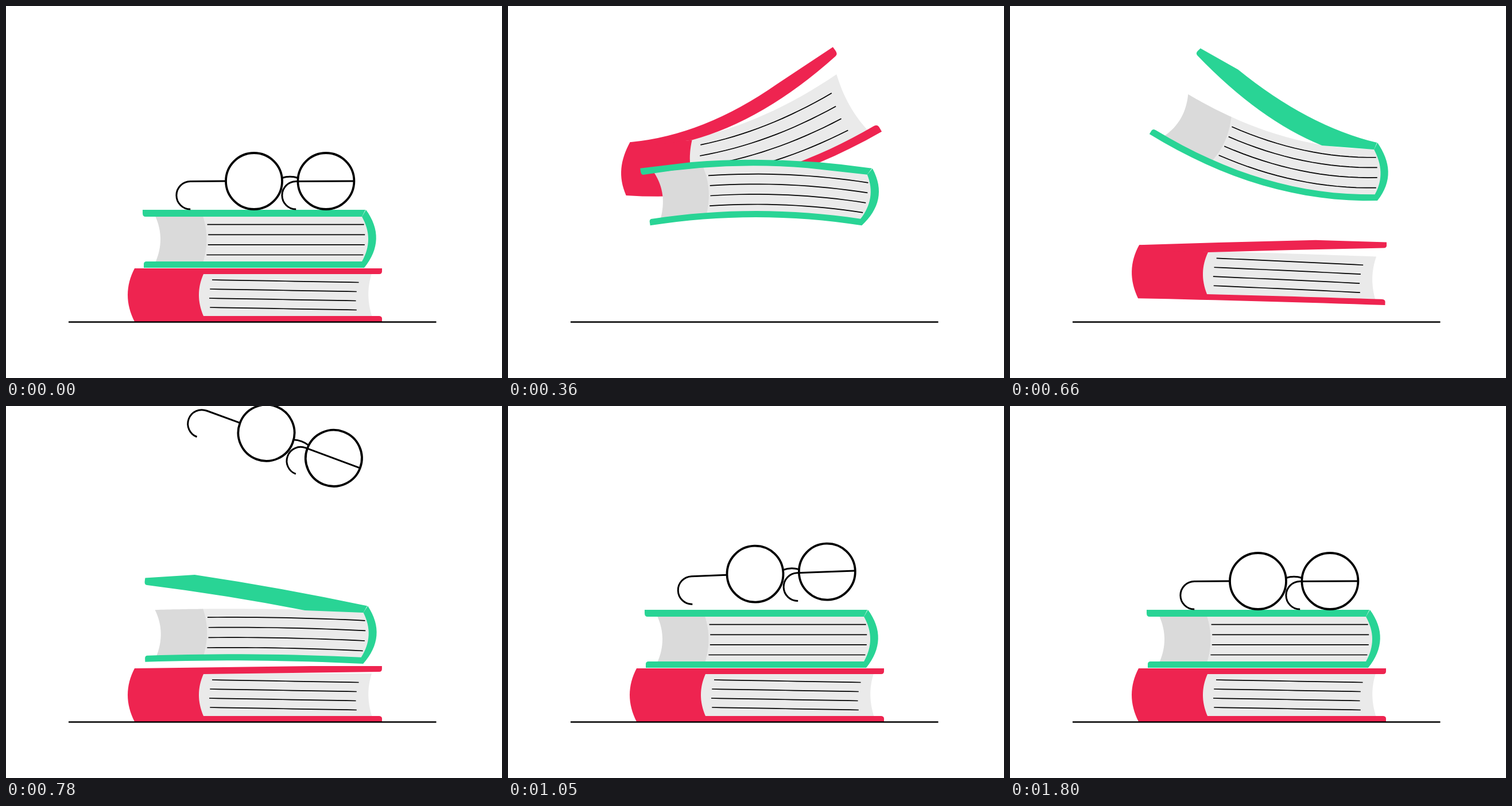
These frames come from a looping animation (864 by 648 pixels, 2460 ms). An HTML page with a canvas:

```html
<!DOCTYPE html>
<html lang="en">
<head>
<meta charset="utf-8">
<title>Books and glasses</title>
<style>
  html, body { margin: 0; width: 100%; height: 100%; overflow: hidden; background: #fff; }
  canvas { display: block; width: 864px; height: 648px; }
</style>
</head>
<body>
<canvas id="stage" width="864" height="648"></canvas>
<script>
const ctx = document.getElementById('stage').getContext('2d');
const LOOP = 2460, STEP = 30, GROUND = 550.5;
const PAPER = '#eaeaea', SHADE = '#dadada';
const LAUNCH = 87, LANDING = 477, SETTLED = 775;

const red = {
  delay: 0, color: '#ee2450', spine: 224, end: 655, top: 457, height: 93,
  slab: 10, hinge: 344, joint: 234, fold: 531, crest: 210, fan: .55,
  lines: { x: 354, y: 477, width: 255.5, gap: 16, drop: 4.5, curve: 1.25, middle: 2 },
  body(fill) {
    fill(PAPER, [344, 465], [328, 503, 344, 542], [638, 542], [625, 503, 637, 466]);
    fill(this.color, [224, 550], [200, 503, 224, 457], [344, 467], [328, 503, 344, 540],
      [649, 540], [655, 540, 655, 545], [655, 550]);
  }
};

const green = {
  delay: 240, color: '#29d495', spine: 626, end: 238, top: 355, height: 101,
  slab: 12, hinge: 519, joint: 620, fold: 324, crest: 300, fan: .05,
  lines: { x: 352.3, y: 380.7, width: 273, gap: 17.6, drop: 0, curve: -1, middle: 1.3 },
  body(fill) {
    fill(PAPER, [341, 366], [356, 406, 341, 447], [622, 447], [642, 406, 622, 366]);
    fill(SHADE, [260, 366], [278, 406, 260, 447], [343, 447], [356, 406, 343, 366]);
    fill(this.color, [627, 355], [664, 406, 624, 456], [240, 456], [240, 450],
      [240, 445, 245, 445], [620, 445], [642, 406, 620, 367]);
  }
};

const mix = (a, b, s) => a + (b - a) * s;
const clamp = s => Math.min(1, Math.max(0, s));
const progress = (t, from, to) => (t - from) / (to - from);
const arch = s => 4 * s * (1 - s);
const bump = (t, from, to) => arch(clamp(progress(t, from, to)));

// Height of a thrown object: one big leap from below, then a small rebound.
const rise = (t, rebound) => t < LANDING
  ? 284 * arch(progress(t, LAUNCH, LANDING))
  : rebound * bump(t, 515, SETTLED);

// The open end lags behind the spine, the pages flex and the cover flaps.
function motion(book, t) {
  const swing = Math.sin(Math.PI * (t - book.crest) / (510 - book.crest));
  const sweep = clamp(progress(t, 150, 545)) ** 1.5;
  return {
    lift: rise(t, 36),
    tilt: 112 * Math.sin(Math.PI * sweep) - 12 * bump(t, 520, 780),
    bow: t < 900 ? 35 * swing / (1 + Math.exp((t - 500) / 40)) : 0,
    open: .3 * Math.exp(-(((t - 460) / 95) ** 2)) + .05 * bump(t, 520, 800)
  };
}

function drawBook(book, time) {
  const t = time - book.delay;
  if (t < STEP) return;
  const { lift, tilt, bow, open } = motion(book, t);
  const { spine, end, top, height, slab } = book;
  const length = end - spine, side = Math.sign(length);
  const span = length * Math.cos(Math.atan(tilt / length));
  const midX = (spine + end) / 2 - side * .2 * Math.max(0, tilt);
  const midY = top + height / 2 - lift;

  // Bends a point of the resting book around its curved centre line.
  const bend = (x, y) => {
    const u = (x - spine) / length, v = (top + height - y) / height;
    const angle = Math.atan((bow * 4 * (1 - 2 * u) - tilt) / span);
    const reach = height * (v - .5 + book.fan * u * v * Math.max(0, tilt) / 112);
    return [midX + span * (u - .5) + reach * Math.sin(angle),
      midY - tilt * (u - .5) + bow * (arch(u) - 1) - reach * Math.cos(angle)];
  };
  const trace = points => {
    let [x, y] = points[0];
    ctx.beginPath();
    ctx.moveTo(...bend(x, y));
    for (const p of points.slice(1)) {
      const [qx, qy] = p.slice(-2);
      const [mx, my] = p.length > 2 ? p : [(x + qx) / 2, (y + qy) / 2];
      for (let i = 1; i <= 16; i++) {
        const s = i / 16;
        ctx.lineTo(...bend(mix(mix(x, mx, s), mix(mx, qx, s), s), mix(mix(y, my, s), mix(my, qy, s), s)));
      }
      [x, y] = [qx, qy];
    }
  };
  book.body((color, ...points) => {
    ctx.fillStyle = color;
    trace([...points, points[0]]);
    ctx.fill();
  });

  const { lines } = book;
  ctx.lineWidth = 1.7;
  for (let i = 0; i < 4; i++) {
    const x = lines.x + lines.curve * (i - lines.middle) ** 2, y = lines.y + lines.gap * i;
    trace([[x, y], [x + lines.width, y + lines.drop]]);
    ctx.stroke();
  }

  // Both long edges of the cover swing up from the spine.
  const swingUp = ([px, py], [x, y]) => {
    const c = Math.cos(open), s = -side * Math.sin(open);
    return [px + (x - px) * c - (y - py) * s, py + (x - px) * s + (y - py) * c];
  };
  const back = bend(spine, top), hinge = bend(book.hinge, top + slab);
  const fold = swingUp(back, bend(book.fold, top));
  const corner = swingUp(hinge, bend(end, top));
  const inner = swingUp(hinge, bend(end, top + slab));
  const rounded = swingUp(hinge, bend(end - side * 5, top + slab));
  const curveTo = ([x1, y1], [x2, y2]) =>
    ctx.quadraticCurveTo((x1 + x2) / 2, (y1 + y2) / 2 + 1.15 * bow, x2, y2);
  ctx.fillStyle = book.color;
  ctx.beginPath();
  ctx.moveTo(...back);
  curveTo(back, fold);
  ctx.lineTo(...corner);
  ctx.lineTo(mix(corner[0], inner[0], .5), mix(corner[1], inner[1], .5));
  ctx.quadraticCurveTo(...inner, ...rounded);
  curveTo(rounded, hinge);
  ctx.lineTo(...bend(book.joint, top + slab));
  ctx.fill();
}

function drawGlasses(time) {
  const t = time - 578;
  if (t < 100) return;
  const turn = t < SETTLED ? Math.max(.083 * (450 - t), -.0075 * (SETTLED - t)) : 0;
  ctx.save();
  ctx.translate(494.7 + .85 * turn, 305 - rise(t, 22));
  ctx.rotate(turn * Math.PI / 180);
  ctx.lineWidth = 3.8;
  for (const lens of [-62.7, 62.7]) {
    ctx.beginPath();
    ctx.arc(lens, 0, 49, 0, 7);
    ctx.stroke();
  }
  ctx.lineWidth = 3;
  for (const [start, hook] of [[-112, -173.5], [111, 10.5]]) {
    ctx.beginPath();
    ctx.moveTo(start, 0);
    ctx.lineTo(hook, .5);
    ctx.arc(hook, 24.8, 24.3, -Math.PI / 2, Math.PI / 2, true);
    ctx.stroke();
  }
  ctx.beginPath();
  ctx.moveTo(-14, -5.5);
  ctx.quadraticCurveTo(0, -10, 14, -5.5);
  ctx.stroke();
  ctx.restore();
}

function draw(now) {
  const frame = Math.floor(now % LOOP / STEP) * STEP;
  const time = frame < STEP ? LOOP : frame;
  ctx.fillStyle = '#fff';
  ctx.fillRect(0, 0, 864, 648);
  ctx.strokeStyle = '#000';
  ctx.save();
  ctx.beginPath();
  ctx.rect(0, 0, 864, GROUND);
  ctx.clip();
  drawBook(red, time);
  drawBook(green, time);
  drawGlasses(time);
  ctx.restore();
  ctx.lineWidth = 2.6;
  ctx.beginPath();
  ctx.moveTo(109, GROUND);
  ctx.lineTo(749.5, GROUND);
  ctx.stroke();
}

const start = performance.now();
function tick() {
  draw(performance.now() - start);
  requestAnimationFrame(tick);
}
tick();
</script>
</body>
</html>
```
